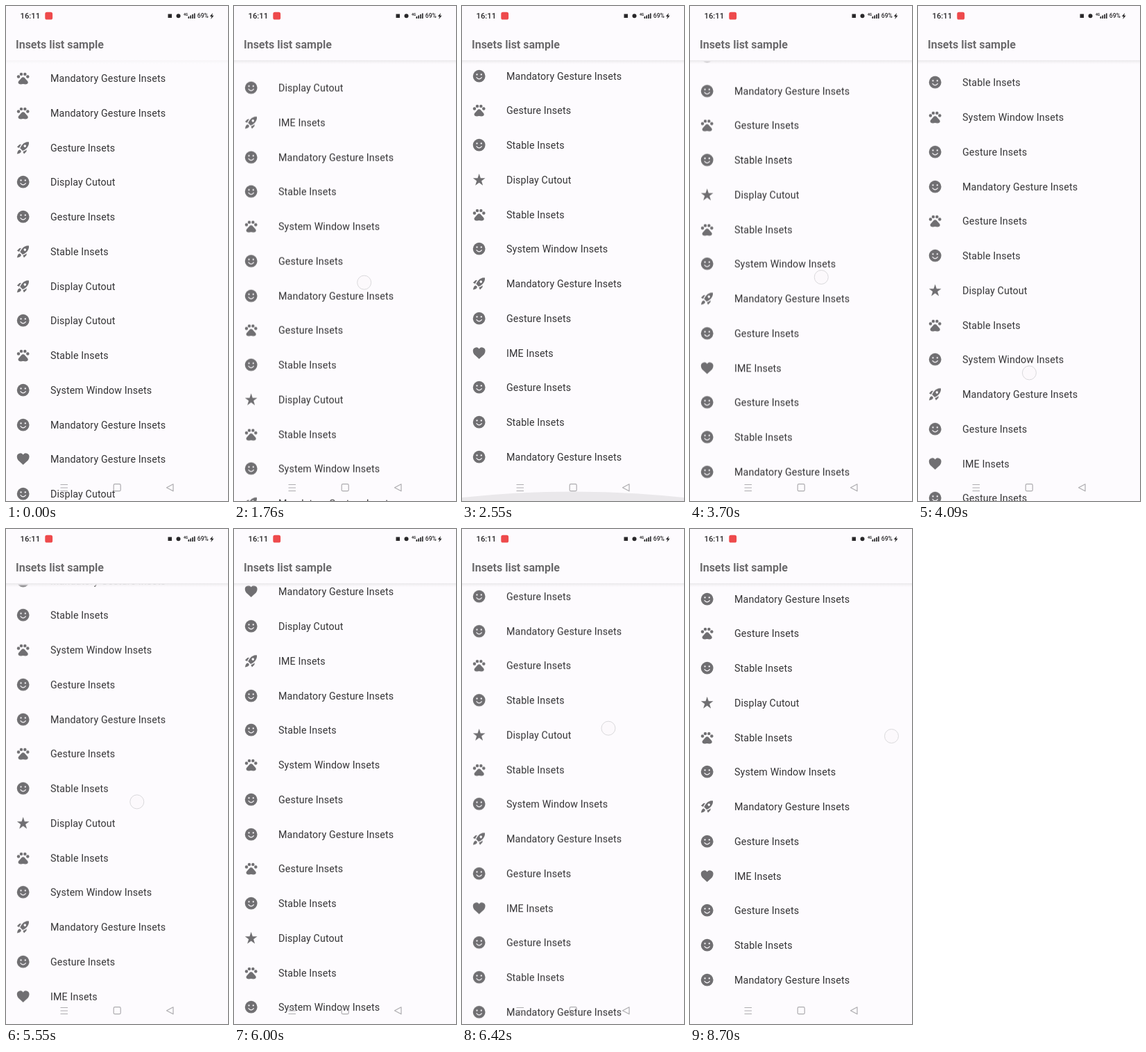
These frames come from a looping animation (320x711 px, 8.73 s). An HTML page:

```html
<!DOCTYPE html>
<html lang="en">
<head>
<meta charset="utf-8">
<title>Insets list</title>
<style>
  html, body { margin: 0; width: 100%; height: 100%; overflow: hidden; background: #fdfbfe; }
  #stage {
    position: relative; width: 320px; height: 711px; overflow: hidden;
    background: #fdfbfe; font-family: Roboto, sans-serif;
  }
  #list { position: absolute; left: 0; top: 79.3px; width: 320px; will-change: transform; }
  .row {
    position: relative; height: 49.75px; line-height: 50.8px; padding-left: 64px;
    font-size: 14.22px; letter-spacing: .133px; color: #343335; white-space: nowrap;
  }
  .row svg { position: absolute; left: 14.2px; top: 14.2px; width: 21.33px; height: 21.33px; fill: #706f72; }
  #bar { position: absolute; left: 0; top: 0; width: 320px; height: 78px; background: #fdfbfe; }
  #shadow {
    position: absolute; left: 0; top: 77px; width: 320px; height: 6px;
    background: linear-gradient(#e2e0e3, #efedf0 35%, #fdfbfe00);
  }
  h1 {
    position: absolute; left: 14px; top: 44.500px; margin: 0;
    font-size: 16px; line-height: 21px; font-weight: 700; color: #6b6a6c; white-space: nowrap;
  }
  .layer { position: absolute; left: 0; top: 0; width: 320px; height: 711px; overflow: hidden; }
  #glow { transform-origin: 160px 711px; }
  #touch {
    position: absolute; left: -10.5px; top: -10.5px; width: 21px; height: 21px; box-sizing: border-box;
    border: 1.5px solid #d9d8db; border-radius: 50%; background: #faf8fbb0; opacity: 0;
  }
</style>
</head>
<body>
<div id="stage">
  <svg width="0" height="0" style="position:absolute">
    <symbol id="smile" viewBox="0 0 24 24">
      <circle cx="12" cy="12" r="10"/>
      <g fill="#fdfbfe"><circle cx="8.5" cy="9.5" r="1.3"/><circle cx="15.5" cy="9.5" r="1.3"/></g>
      <path d="M7.5 14Q12 19.500 16.500 14" fill="none" stroke="#fdfbfe" stroke-width="1.4"/>
    </symbol>
    <symbol id="paw" viewBox="0 0 24 24">
      <circle cx="4.5" cy="9.5" r="2.5"/><circle cx="9" cy="5.5" r="2.5"/>
      <circle cx="15" cy="5.5" r="2.5"/><circle cx="19.5" cy="9.5" r="2.5"/>
      <path d="M12 10.5Q13.600 10.500 15 12L17.500 15Q20.500 18 19.900 19.600Q19 23 12 21.500Q5 23 4.100 19.600Q3.500 18 6.500 15L9 12Q10.400 10.500 12 10.500z"/>
    </symbol>
    <symbol id="rocket" viewBox="0 0 24 24">
      <g transform="rotate(45 12 12)">
        <path d="M9 16Q7.500 12 7.500 9.300C7.500 2 11.500-.8 12-1.100C12.500-.8 16.500 2 16.500 9.300Q16.500 12 15 16z"/>
        <circle cx="12" cy="7.800" r="2" fill="#fdfbfe"/>
        <path id="fin" d="M6 10L4 12.400V18L7.700 16.700Q6 13 6 10z"/>
        <use href="#fin" transform="matrix(-1 0 0 1 24 0)"/>
        <path d="M10 18.400A3 3 0 0 1 14 18.400Q15.500 21 12 26Q8.500 21 10 18.400z"/>
      </g>
    </symbol>
    <symbol id="heart" viewBox="0 0 24 24">
      <path d="M12 21.300L4 14Q2 11.500 2 8.500A5.500 5.500 0 0 1 12 5.100A5.500 5.500 0 0 1 22 8.500Q22 11.500 20 14z"/>
    </symbol>
    <symbol id="star" viewBox="0 0 24 24"><polygon/></symbol>
  </svg>

  <div id="list"></div>

  <svg class="layer" viewBox="0 0 320 711">
    <g id="glow"><path d="M-100 736Q160 610 420 736z" fill-opacity=".11"/></g>
    <g fill="none" stroke="#adacaf" stroke-width="1.2">
      <path d="M78.500 687.500h10.500m-10.500 4.500h10.500m-10.500 4.500h10.500"/>
      <rect x="155.200" y="686.700" width="10" height="10" rx="1.800"/>
      <path d="M241 686.800v10l-9.500-5z" stroke-linejoin="round"/>
    </g>
  </svg>

  <div id="shadow"></div>
  <div id="bar"><h1>Insets list sample</h1></div>

  <svg class="layer" viewBox="0 0 320 711" fill="#29282a">
    <text x="20.5" y="18.200" font-size="11.3" font-weight="500">16:11</text>
    <rect x="56.300" y="8.800" width="10.800" height="10.800" rx="2.600" fill="#ee4a4c"/>
    <rect x="233.500" y="11.500" width="5.500" height="5.500"/>
    <circle cx="248.500" cy="14.300" r="3"/>
    <text x="256" y="13.800" font-size="5" font-weight="700">4G</text>
    <path d="M262.500 18v-3h1.700v3zm2.800 0v-4.500h1.700v4.500zm2.800 0v-6h1.700v6zm2.800 0v-7.500h1.700v7.500z"/>
    <text x="275.800" y="17.400" font-size="8.600" font-weight="500">69%</text>
    <path d="M298 10l-4.200 5h2.500l-1 4 4.300-5.200h-2.500z"/>
  </svg>

  <div id="touch"></div>
</div>

<script>
  const LOOP = 8730;
  const END = 899; // scroll distance from first to last position
  const $ = id => document.getElementById(id);
  const clamp = (v, lo = 0, hi = 1) => Math.min(hi, Math.max(lo, v));
  const easeOut = u => 1 - (1 - u) ** 2;

  const starPoint = (_, i) => {
    const r = i % 2 ? 4.1 : 10.5, a = i * Math.PI / 5;
    return [12 + r * Math.sin(a), 12.500 - r * Math.cos(a)];
  };
  document.querySelector('#star polygon').setAttribute('points', Array.from({ length: 10 }, starPoint).join(' '));

  const icons = { s: 'smile', p: 'paw', r: 'rocket', h: 'heart', t: 'star' };
  const labels = {
    M: 'Mandatory Gesture Insets', G: 'Gesture Insets', D: 'Display Cutout',
    S: 'Stable Insets', W: 'System Window Insets', I: 'IME Insets'
  };
  // Each item: icon key, then label key
  const items = 'pM pM rG sD sG rS rD sD pS sW sM hM sD rI sM sS pW sG ' +
    'sM pG sS tD pS sW rM sG hI sG sS sM';
  $('list').innerHTML = items.split(' ').map(([icon, label]) =>
    `<div class="row"><svg><use href="#${icons[icon]}"/></svg>${labels[label]}</div>`).join('');

  // The finger moves from y to y2, then the list coasts on
  const swipes = [
    { at: 30, ms: 240, y: 510, y2: 200, coast: -110, coastMs: 250 },
    { at: 1640, ms: 200, y: 560, y2: 290, coast: -209, coastMs: 650 },
    { at: 3640, ms: 660, y: 367.5, y2: 600, coast: 20, coastMs: 180 },
    { at: 4520, ms: 540, y: 510, y2: 209, hold: 90 },
    { at: 5420, ms: 230, y: 218.5, y2: 522, coast: 40, coastMs: 560 },
    { at: 6300, ms: 140, y: 583, y2: 239 }
  ];
  const taps = [
    { at: 3300, ms: 60, x: 165, y: 453.5 },
    { at: 7790, ms: 150, x: 282, y: 298.5 },
    { at: 8580, ms: 150, x: 290, y: 297 }
  ];
  const glows = [
    { at: 2490, rise: 120, hold: 0, fall: 300, size: .7, x: 0 },
    { at: 4974, rise: 86, hold: 90, fall: 240, size: 1, x: 36 }
  ];
  const touches = [...swipes, ...taps];
  const FADE = 90;

  const fingerY = ({ at, ms, y, y2 = y }, t) => y + (y2 - y) * clamp((t - at) / ms);
  const thumbX = y => 160 + .21 * (526 - y);

  // Distance left to the end of the list
  function remaining(t) {
    let left = END;
    for (const s of swipes) {
      if (t < s.at) break;
      const { coast = 0, coastMs = 1 } = s;
      const coasted = coast * easeOut(clamp((t - s.at - s.ms) / coastMs));
      left = clamp(left + fingerY(s, t) - s.y + coasted, 0, END);
    }
    return left;
  }

  function drawTouch(t) {
    const style = $('touch').style;
    const active = touches.find(({ at, ms, hold = 0 }) => t >= at && t < at + ms + hold + FADE);
    style.opacity = 0;
    if (!active) return;
    const { at, ms, hold = 0 } = active;
    const y = fingerY(active, t), x = active.x ?? thumbX(y);
    style.opacity = clamp((at + ms + hold + FADE - t) / FADE);
    style.transform = `translate(${x}px, ${y}px)`;
  }

  function drawGlow(t) {
    const g = glows.findLast(g => t >= g.at) ?? glows[0];
    const fallen = clamp((t - g.at - g.rise - g.hold) / g.fall);
    const scale = g.size * clamp((t - g.at) / g.rise) * (1 - easeOut(fallen));
    $('glow').style.transform = `translateX(${g.x}px) scaleY(${scale})`;
    $('glow').style.opacity = scale && .5 + scale / 2;
  }

  const start = performance.now();
  function frame() {
    const t = (performance.now() - start) % LOOP;
    const scrolled = END - remaining(t);
    $('list').style.transform = `translateY(${-scrolled}px)`;
    $('shadow').style.opacity = clamp(.35 + scrolled / 80);
    drawTouch(t);
    drawGlow(t);
    requestAnimationFrame(frame);
  }
  frame();
</script>
</body>
</html>
```
